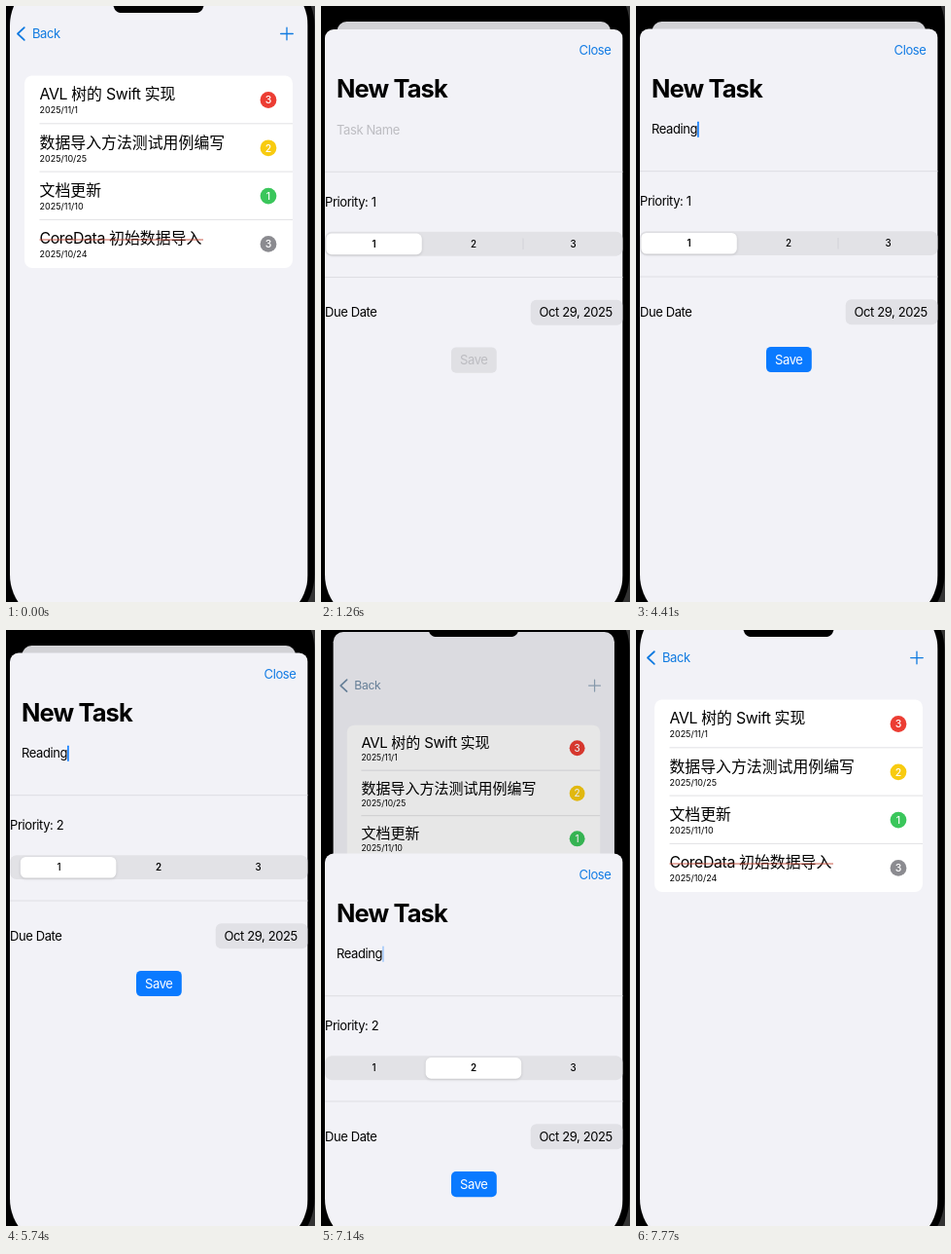
Write an HTML page that moves like this. It is 318 px wide and 612 px high and loops after 8 s.

```html
<!DOCTYPE html>
<html lang="zh-Hans">
<meta charset="utf-8">
<title>New Task</title>
<style>
  html, body { margin: 0; width: 100%; height: 100%; overflow: hidden; background: #333; }
  svg { display: block; width: 100%; height: 100%; }
  text { font: 13px Inter, "Noto Sans CJK SC", "Noto Sans CJK", sans-serif; letter-spacing: -.4px; }
  .name { font-size: 15.9px; letter-spacing: 0; }
  .name tspan { letter-spacing: -.4px; }
  .date { font-size: 9px; letter-spacing: 0; }
  .badge { font-size: 10.5px; font-weight: 500; letter-spacing: 0; fill: #fff; text-anchor: middle; }
  .title { font-size: 25.5px; font-weight: 700; letter-spacing: -.9px; }
  .seg { font-size: 9.8px; font-weight: 500; letter-spacing: 0; text-anchor: middle; }
  .seg.on { font-weight: 600; }
  #tint path { fill: none; stroke: currentColor; stroke-linecap: round; stroke-linejoin: round; }
  #tint text { fill: currentColor; }
  #thumb { filter: drop-shadow(0 1px 1.5px #0002); }
</style>
<svg viewBox="0 0 318 612">
  <clipPath id="screen"><rect x="4" y="-30" width="306.6" height="664" rx="50"/></clipPath>
  <rect x="-7" y="-38" width="324.5" height="680" rx="58"/>
  <g clip-path="url(#screen)">
    <g id="list">
      <rect x="4" y="-30" width="306.6" height="664" rx="11" fill="#f2f2f7"/>
      <g id="tint">
        <path d="M18.8 22.2L12 28.5l6.8 6.3" stroke-width="1.8"/>
        <text x="27" y="33">Back</text>
        <path id="plus" d="M282.7 28.5h12.6M289 22.2v12.6" stroke-width="1.3"/>
      </g>
      <rect x="19" y="71.5" width="276" height="197.5" rx="8" fill="#fff"/>
      <g id="rows"></g>
      <rect id="dim" x="4" y="-30" width="306.6" height="664" rx="11"/>
    </g>
    <g id="sheet">
      <rect x="4" y="23.5" width="306.6" height="640" rx="9" fill="#f2f2f7"/>
      <text x="298.5" y="49.5" text-anchor="end" fill="#117be4">Close</text>
      <text class="title" x="16" y="93.5">New Task</text>
      <text id="field" x="16" y="131.3"></text>
      <rect id="caret" y="118.5" width="1.6" height="16.5" rx=".8" fill="#0a7aff"/>
      <path d="M4 169.7h307M4 278h307" stroke="#d9d9dd" stroke-width=".8"/>
      <text id="priority" x="4" y="205.2"></text>
      <rect x="4" y="231.3" width="306.6" height="24.8" rx="7" fill="#e2e2e6"/>
      <path id="bar" d="M208 238v11.5" stroke="#d0d0d5" stroke-width=".8"/>
      <rect id="thumb" y="233" width="98.5" height="21.6" rx="5.5" fill="#fff"/>
      <text class="seg" x="54.5" y="247.2">1</text>
      <text class="seg" x="157" y="247.2">2</text>
      <text class="seg" x="259.5" y="247.2">3</text>
      <text x="4" y="318.5">Due Date</text>
      <rect x="215.7" y="301.2" width="94.8" height="26" rx="6" fill="#e1e1e6"/>
      <text x="224.5" y="318.5">Oct 29, 2025</text>
      <rect id="save" x="134" y="349.9" width="46.8" height="26.2" rx="5"/>
      <text id="saveText" x="157.3" y="367.6" text-anchor="middle">Save</text>
    </g>
  </g>
  <path d="M106-2c3 0 4 1 5 3 1 4 4 6 8 6h76c4 0 7-2 8-6 1-2 2-3 5-3z"/>
</svg>
<script>
const $ = id => document.getElementById(id);
const segs = document.querySelectorAll('.seg');
const tasks = [
  ['AVL 树的 Swift 实现', '2025/11/1', 3, '#ec3d33'],
  ['数据导入方法测试用例编写', '2025/10/25', 2, '#f8cb10'],
  ['文档更新', '2025/11/10', 1, '#3ac65b'],
  ['CoreData 初始数据导入', '2025/10/24', 3, '#8b8b90'],
];
const word = 'Reading';
const keyTimes = [3290, 3430, 3640, 3920, 4200, 4340, 4410];

$('rows').innerHTML = tasks.map(([name, date, level, color], i) => `
  <g transform="translate(0 ${i * 49.3})">
    ${i ? '<path d="M34.5 71.5H295" stroke="#dadadd" stroke-width=".8"/>' : ''}
    <text class="name" x="34.5" y="96.3">${name.replace(/[A-Za-z ]+/g, '<tspan>$&</tspan>')}</text>
    <text class="date" x="34.5" y="110.3">${date}</text>
    <circle cx="270" cy="96.5" r="8.4" fill="${color}"/>
    <text class="badge" x="270" y="100.3">${level}</text>
  </g>`).join('') + '<path d="M34.5 240H203" stroke="#c24634" stroke-width=".9"/>';

const clamp = v => Math.min(1, Math.max(0, v));
const mix = (a, b, k) => `color-mix(in srgb, ${b} ${k * 100}%, ${a})`;
const set = (id, attrs) => {
  for (const k in attrs) $(id).setAttribute(k, attrs[k]);
};
// Critically damped spring, 0 to 1
const spring = (ms, speed = 14.9) => {
  const x = Math.max(0, ms) / 1000 * speed;
  return 1 - (1 + x) * Math.exp(-x);
};

function caretOpacity(t) {
  if (t < 2590) return 0;
  if (t < 4970) return 1;
  const phase = (t - 4970) % 1050;
  return clamp(Math.max(1 - (phase + 70) / 210, (phase - 350) / 140));
}

function draw(t) {
  const open = t < 7060 ? spring(t - 631) : 1 - spring(t - 7060);
  const back = open ** .9; // the list moves slightly ahead of the sheet
  set('list', { transform:
    `translate(157.3 ${46 * back - 30}) scale(${1 - .0814 * back}) translate(-157.3 30)` });
  set('dim', { opacity: .135 * back });
  set('sheet', { transform: `translate(0 ${616 * (1 - open)})` });
  $('tint').style.color = mix('#0f7ae0', '#84909c', clamp(back * 1.2));
  set('plus', { opacity: t >= 490 && t < 700 ? .3 : 1 - .4 * back });

  const typed = word.slice(0, keyTimes.filter(k => t >= k).length);
  $('field').textContent = typed || 'Task Name';
  set('field', { fill: typed ? '#000' : '#bdbdc2' });
  set('caret', {
    x: 16 + (typed && $('field').getComputedTextLength()),
    opacity: caretOpacity(t),
  });

  const ready = clamp((t - 3220) / 210);
  $('save').style.fill = mix('#e0e0e4', '#0a7aff', ready);
  $('saveText').style.fill = mix('#bcbcc1', '#fff', ready);

  const level = t < 5740 ? 1 : 2;
  $('priority').textContent = 'Priority: ' + level;
  segs.forEach((s, i) => s.classList.toggle('on', i + 1 === level));
  set('thumb', { x: 5.3 + 102.4 * spring(t - 5710, 17) });
  set('bar', { opacity: level === 1 ? 1 : 0 });
}

const STEP = 70, LOOP = 8000;
function tick() {
  const t = performance.now() % LOOP;
  draw(Math.floor(t / STEP) * STEP);
  requestAnimationFrame(tick);
}
tick();
</script>
</html>
```
